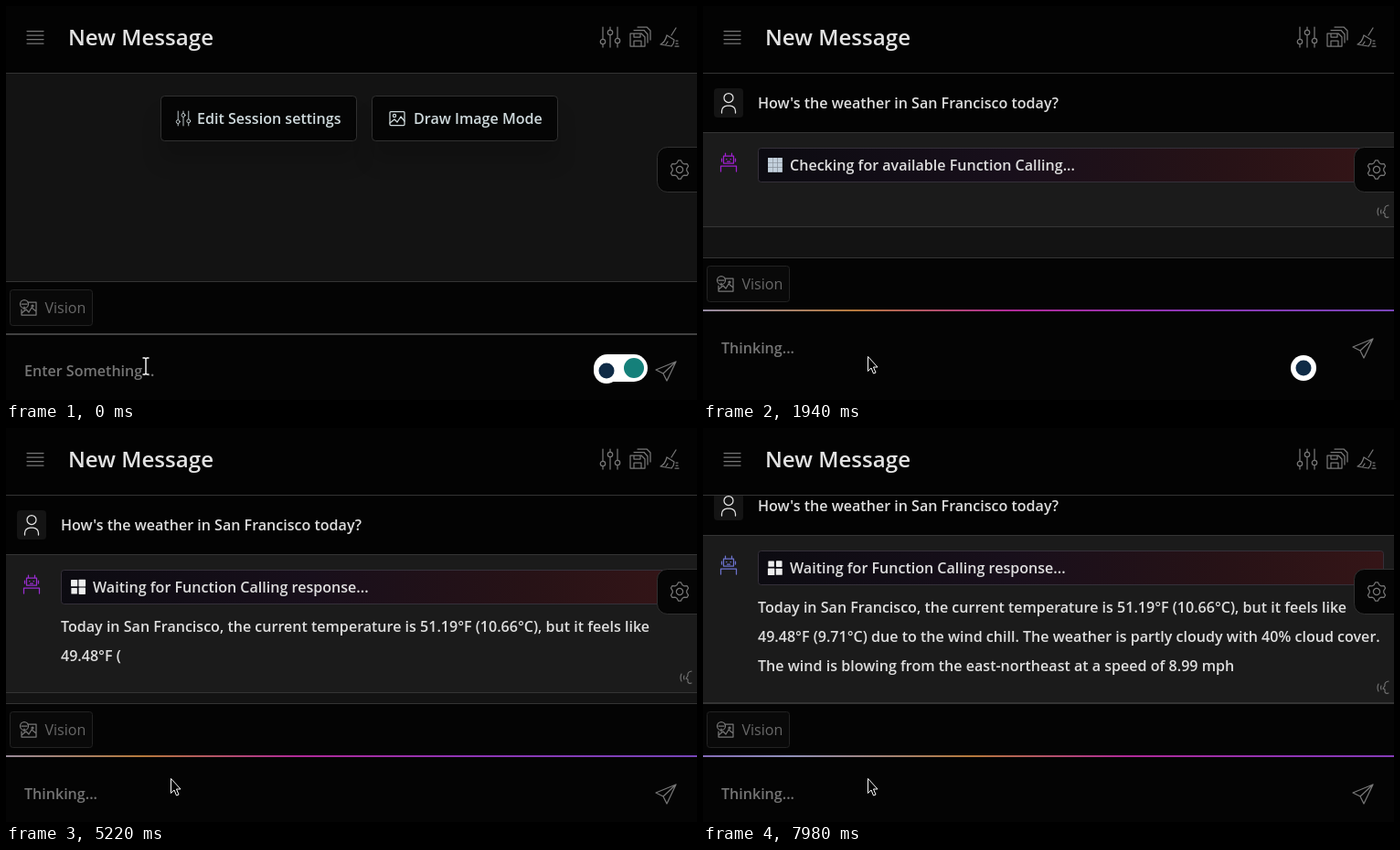
These frames come from a looping animation (756x431 px, 8000 ms). An HTML page:

```html
<!DOCTYPE html>
<html lang="en">
<head>
<meta charset="utf-8">
<title>Chat with function calling</title>
<style>
  html, body { margin: 0; width: 100%; height: 100%; overflow: hidden; background: #030303; }
  svg { display: block; width: 756px; height: 431px; }
  text { font: 600 16.07px "Open Sans", "Noto Sans", sans-serif; fill: #dedede; white-space: pre; }
  .icon { fill: none; stroke: #777; stroke-width: 1.25; stroke-linejoin: round; stroke-linecap: round; }
  .box { fill: #050505; stroke: #303030; }
  .raised { filter: drop-shadow(0 22px 10px rgba(0, 0, 0, .14)); }
  .raised text { fill: #cfdadd; }
  .raised .icon { stroke: #cfdadd; }
</style>
</head>
<body>
<svg viewBox="0 0 756 431">
  <defs>
    <linearGradient id="barFill">
      <stop offset="0" stop-color="#0c0b11"/>
      <stop offset=".4" stop-color="#180f1b"/>
      <stop offset=".75" stop-color="#271216"/>
      <stop offset="1" stop-color="#351517"/>
    </linearGradient>
    <linearGradient id="glow" gradientUnits="userSpaceOnUse" y1="0" y2="0" spreadMethod="repeat">
      <stop offset="0" stop-color="#b5793c"/>
      <stop offset=".17" stop-color="#b02a98"/>
      <stop offset=".35" stop-color="#8f35b5"/>
      <stop offset=".6" stop-color="#7745b8"/>
      <stop offset=".8" stop-color="#8f8fb8"/>
      <stop offset="1" stop-color="#b5793c"/>
    </linearGradient>
    <g id="sliders">
      <path d="M-8-11V2M-8 8V11M0-11V-8M0-2V11M8-11V1M8 7V11"/>
      <circle cx="-8" cy="5" r="2.7"/><circle cy="-5" r="2.7"/><circle cx="8" cy="4" r="2.7"/>
    </g>
    <path id="beamShape" d="M-3.5-9H-1L0-8 1-9H3.500M0-8V8M-3.500 9H-1L0 8 1 9H3.500"/>
  </defs>

  <rect width="756" height="431" fill="#131313"/>

  <g id="welcome">
    <g class="raised">
      <rect class="box" x="169.5" y="98.5" width="214" height="49" rx="4"/>
      <use class="icon" href="#sliders" transform="translate(194 123) scale(.72)"/>
      <text x="209" y="129">Edit Session settings</text>
    </g>
    <g class="raised">
      <rect class="box" x="400.5" y="98.5" width="203" height="49" rx="4"/>
      <g class="icon" transform="translate(428 123)">
        <rect x="-8" y="-7.5" width="16" height="15" rx="1"/>
        <circle cx="-3" cy="-3" r="1.6"/><path d="M-8 5-3 1 0 4 4-2 8 3"/>
      </g>
      <text x="446" y="129">Draw Image Mode</text>
    </g>
  </g>

  <g id="messages">
    <rect y="74" width="756" height="64" fill="#030303"/>
    <rect x="12" y="90" width="32" height="32" rx="4" fill="#141414"/>
    <g class="icon" style="stroke:#e4e4e4">
      <circle cx="28" cy="100.5" r="5"/>
      <path d="M20.5 117v-2a6 6 0 0 1 6-6h3a6 6 0 0 1 6 6v2"/>
    </g>
    <text x="60" y="112">How's the weather in San Francisco today?</text>
    <rect id="reply" x="-2" y="138.5" width="760" fill="#1b1b1b" stroke="#353535"/>
    <path id="robot" class="icon" d="M22.500 164h11v8h-11zM24.500 164v-3M31.500 164v-3M20.500 167v3M35.500 167v3M25.500 167.500h.5M30 167.500h.5M26.500 170h3M19.500 181v-6h17v6"/>
    <rect x="60.5" y="155.5" width="684" height="37" rx="3" fill="url(#barFill)" stroke="#35303a"/>
    <g id="spinner" transform="translate(70.3 165.3) scale(.72)"></g>
    <text id="status" x="95" y="180"></text>
    <text class="answer" x="60" y="223"></text>
    <text class="answer" x="60" y="255"></text>
    <text class="answer" x="60" y="287"></text>
    <path id="voice" class="icon" style="stroke-width:1.1" d="M739-4q-2 4 0 8M742-2q-1 2 0 4M750-7q-5 1-4 5l-2 3 2 1v3q1 2 4 1"/>
  </g>

  <rect width="756" height="73" fill="#030303"/>
  <path d="M0 73.5H756" stroke="#333"/>
  <path class="icon" d="M23 27.5H41M23 32H41M23 36.5H41M23 41H41"/>
  <text x="68" y="43" style="font-size:24.1px;fill:#e2e2e2">New Message</text>
  <use class="icon" href="#sliders" transform="translate(661 34)"/>
  <path class="icon" transform="translate(693 34)" d="M-10-4H2L6 0V10H-10ZM-6-4V0H1V-4M-6 10V4H2V10M-6-7.500H5L9-3V6M-2-11H8L12-7V3"/>
  <path class="icon" transform="translate(726 34)" d="M7-10 2-2M-3-2 5 3M-3-2Q-5 6-10 8L2 10Q5 7 5 3M-4 8-2 5M7 4H9M7 7H9M6 10H10"/>

  <g id="panel">
    <rect width="756" height="300" fill="#040404"/>
    <path d="M0 .5H756" stroke="#343434"/>
    <rect x="4.5" y="9.5" width="90" height="39" rx="3" fill="#090909" stroke="#222"/>
    <g class="icon" transform="translate(24 29)">
      <path d="M0-6H9V8H-7V2M-7 6-2 2 1 5 4 0 9 4"/>
      <circle cx="-4" cy="-4" r="4.5"/><path d="M-7-4H-1M-4-1V2"/><circle cx="5" cy="-2" r="1"/>
    </g>
    <text x="42.5" y="35" style="font-weight:400;fill:#686868">Vision</text>
    <rect id="line" y="57" width="756" height="2"/>
    <text id="input" x="20"></text>
    <rect id="caret" width="1" height="22" fill="#ddd"/>
  </g>
  <path id="send" class="icon" d="M11-10-11-1-3 3 1 11ZM-3 3 11-10"/>

  <g id="badges">
    <g id="wideBadge">
      <rect x="643" y="381" width="59" height="30" rx="15" fill="#fff"/>
      <circle cx="687" cy="396" r="11" fill="#15807a"/>
    </g>
    <g id="smallBadge">
      <circle cx="657" cy="396" r="14" fill="#fff"/>
      <circle cx="657" cy="396" r="8.5" fill="#0f2b46"/>
    </g>
  </g>

  <rect x="712.5" y="154.5" width="60" height="49" rx="11" class="box"/>
  <g class="icon" transform="translate(737 179)"><path id="gear"/><circle r="3.6"/></g>

  <g id="beam" fill="none">
    <use href="#beamShape" stroke="#000" stroke-width="3.5"/>
    <use href="#beamShape" stroke="#fff" stroke-width="1.4"/>
  </g>
  <path id="arrow" d="M180.500 383.500V399.500L184 396 186.500 402 189 401 186.500 395H191Z" fill="#000" stroke="#fff"/>
</svg>

<script>
const LOOP = 8000, SUBMIT = 1730, CALLED = 2450;
const QUESTION = "How's the weather in San Francisco today?";
const ANSWER = "Today in San Francisco, the current temperature is 51.19°F (10.66°C), but it feels like\n" +
  "49.48°F (9.71°C) due to the wind chill. The weather is partly cloudy with 40% cloud cover.\n" +
  "The wind is blowing from the east-northeast at a speed of 8.99 mph";
const TOKENS = ANSWER.match(/\s?(?:[A-Za-z]+|\d+(?:\.\d+)?|[^\sA-Za-z\d]+)/g);

const $ = id => document.getElementById(id);
const set = (el, attrs) => { for (const k in attrs) el.setAttribute(k, attrs[k]); };
const show = (id, on) => { $(id).style.display = on ? "" : "none"; };
const move = (id, x, y) => set($(id), { transform: `translate(${x} ${y})` });
const clamp = v => Math.min(1, Math.max(0, v));
const mix = (a, b, k) => a + (b - a) * k;
const ease = v => { const p = clamp(v); return p * p * (3 - 2 * p); };

// Streaming pace: each phrase is complete at its time.
const pace = [[2700, ""], [3735, "51.19°F ("], [5205, "49.48°F ("], [6235, "cloudy with"], [7960, "mph"]]
  .map(([time, phrase]) => [time, phrase ? ANSWER.indexOf(phrase) + phrase.length : 0]);

function streamed(t) {
  let chars = 0;
  for (let i = 1; i < pace.length; i++) {
    const [t0, c0] = pace[i - 1], [t1, c1] = pace[i];
    if (t >= t0) chars = mix(c0, c1, clamp((t - t0) / (t1 - t0)));
  }
  let out = "";
  for (const token of TOKENS) {
    if (out.length + token.length > chars + .01) break;
    out += token;
  }
  return out;
}

const blocks = Array.from({ length: 9 }, () => {
  const rect = document.createElementNS("http://www.w3.org/2000/svg", "rect");
  return $("spinner").appendChild(rect);
});

function pulse(ms) {
  const u = ms / 600;
  return u < 0 || u > 1 ? 0 : u < .2 ? u / .2 : (1 - u) / .8;
}

function drawSpinner(t) {
  const wave = t < CALLED, n = wave ? 3 : 2;
  const phase = (t - (wave ? 1950 : CALLED) + 1200) % 1200;
  blocks.forEach((rect, i) => {
    const col = i % n, row = Math.floor(i / n);
    const size = row >= n ? 0
      : wave ? 7.33 - 6 * pulse(phase - 100 * (col + row))
      : 9 + 2 * pulse(phase - 150 * (row ? 3 - col : col));
    const step = wave ? 7.33 : 12, start = wave ? 4.67 : 6;
    set(rect, {
      x: start + col * step - size / 2, y: start + row * step - size / 2,
      width: size, height: size, rx: wave ? 0 : .8, fill: wave ? "#c3d0dc" : "#eee"
    });
  });
}

function drawMessages(t) {
  const lines = streamed(t).split("\n");
  const count = lines[0] ? lines.length : 0;
  const bottom = [241, 257, 289, 321][count];
  document.querySelectorAll(".answer").forEach((el, i) => { el.textContent = lines[i] || ""; });
  $("status").textContent = t < CALLED
    ? "Checking for available Function Calling..."
    : "Waiting for Function Calling response...";
  set($("reply"), { height: bottom - 138 });
  move("voice", 0, bottom - 16);
  move("messages", 0, -21 * ease((t - 6660) / 200));
  const k = clamp((t - 1940) / 6040) ** 3;
  $("robot").style.stroke = `rgb(${mix(160, 108, k)},${mix(32, 115, k)},${mix(208, 205, k)})`;
  drawSpinner(t);
}

function drawPanel(t) {
  const sent = t >= SUBMIT;
  const open = sent ? 1 - ease((t - SUBMIT) / 283) : ease(t / 350);
  const top = Math.round(mix(301, 141, open));
  move("panel", 0, top);
  move("send", 722, sent ? top + 99 : 399);

  const typed = sent ? "" : QUESTION.slice(0, Math.round(QUESTION.length * clamp((t - 880) / 760)));
  const input = $("input");
  input.textContent = sent ? "Thinking..." : typed || "Enter Something...";
  input.style.fill = typed ? "#dedede" : "#757575";
  set(input, { y: sent ? 105 : Math.round(104 - 3 * open) });
  show("caret", typed);
  if (typed) set($("caret"), { x: 20 + input.getComputedTextLength(), y: 84 });

  // A colour band one cycle wide drifts left.
  const start = 150 - .31 * (t - 5220);
  set($("glow"), { x1: start, x2: start + 1000 });
  set($("line"), { fill: sent ? "url(#glow)" : "#414141" });

  show("badges", t < 2240);
  show("wideBadge", !sent);
  move("smallBadge", 0, sent ? 0 : 3 * (1 - open));
}

function render(t) {
  const sent = t >= SUBMIT;
  show("welcome", !sent);
  show("messages", sent);
  if (sent) drawMessages(t);
  drawPanel(t);
  const k = ease(t / 620);
  move("beam", mix(153, 181, k), mix(394, 383, k));
  show("beam", !sent);
  show("arrow", sent);
}

// Six-toothed gear outline
set($("gear"), {
  d: "M" + Array.from({ length: 24 }, (_, i) => {
    const r = i % 4 < 2 ? 10.3 : 7.8, a = (i - .5) * Math.PI / 12 + Math.PI / 6;
    return `${(r * Math.cos(a)).toFixed(2)} ${(r * Math.sin(a)).toFixed(2)}`;
  }).join("L") + "Z"
});

const begin = performance.now();
function frame() {
  render((performance.now() - begin) % LOOP);
  requestAnimationFrame(frame);
}
frame();
</script>
</body>
</html>
```
